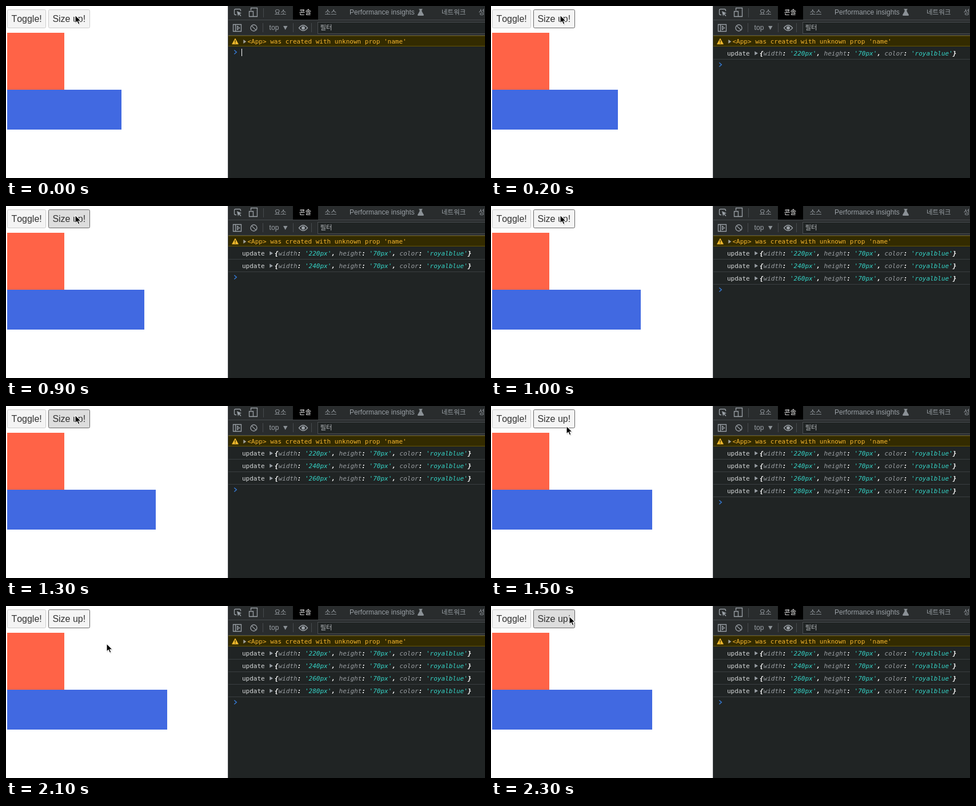
An HTML page for the animation above (2.4 s loop, 838 by 302 pixels).

```html
<!DOCTYPE html>
<html lang="ko">
<head>
<meta charset="utf-8">
<title>Console updates</title>
<style>
html, body { margin: 0; width: 100%; height: 100%; overflow: hidden; background: #fff; }
svg { display: block; }
text { white-space: pre; }
.button { font: 16px "Liberation Sans", Arial, sans-serif; font-kerning: none; fill: #333; }
.ui { font: 12px "Liberation Sans", Arial, sans-serif; letter-spacing: .06px; fill: #9aa0a6; }
.ko { font: 11.5px "Noto Sans CJK KR", "Noto Sans CJK", "Noto Sans CJK JP", sans-serif; fill: #9aa0a6; }
.mono { font: 11px "DejaVu Sans Mono", Menlo, monospace; fill: #d5d8d9; }
.object { font-style: italic; fill: #fff; }
.key { fill: #9a9fa3; }
.value { fill: #35d4c7; }
.mark { font-weight: bold; }
.icon { fill: none; stroke: #9aa0a6; stroke-width: 1.3; }
.line { fill: none; stroke: #474b4e; }
</style>
</head>
<body>
<svg width="838" height="302" viewBox="0 0 838 302">
  <g stroke="#ccc" fill="#f4f4f4">
    <rect x="2.5" y="6.5" width="67" height="32" rx="2"/>
    <rect id="size" x="74.5" y="6.5" width="72" height="32" rx="2"/>
  </g>
  <text class="button" x="9.4" y="28">Toggle!</text>
  <text class="button" x="81.4" y="28">Size up!</text>
  <rect x="2" y="47" width="100" height="100" fill="tomato"/>
  <rect id="bar" x="2" y="147" width="200" height="70" fill="royalblue"/>

  <rect x="388" width="450" height="302" fill="#202424"/>
  <rect x="388" width="450" height="51" fill="#292c2d"/>
  <rect x="502" width="44" height="24" fill="#000"/>
  <rect x="545.5" y="28.5" width="300" height="20" fill="#202424" stroke="#4a4e51"/>
  <path class="line" d="M388 24.5H838M388 51.5H838M388.5 0V302M450.5 4V20M449.5 30V46M502.5 30V46M534.5 30V46"/>

  <g class="icon">
    <path d="M403 15.500H401.500Q399.500 15.500 399.500 13.500V7.500Q399.500 5.500 401.500 5.500H408.500Q410.500 5.500 410.500 7.500V9"/>
    <path d="M404 9L412 12.500 408.700 13.700 411.500 17 410.500 18 407.500 14.800 406 18Z" fill="#9aa0a6" stroke="none"/>
    <path d="M428.500 8V3.500H439.500V18.500H433M425.500 9.500H432.500V18.500H425.500Z"/>
    <path d="M397.500 32.500H411.500V44.500H397.500ZM401.500 32.500V44.500M404.500 35.500L408.500 38.500 404.500 41.500Z"/>
    <circle cx="433.500" cy="38.500" r="5.500"/>
    <path d="M429.600 34.600L437.400 42.400"/>
    <path d="M512.500 38.500Q520 29 527.500 38.500Q520 48 512.500 38.500Z"/>
    <circle cx="520" cy="38.500" r="2.300" fill="#9aa0a6"/>
  </g>
  <path d="M722.500 5H728.500V6.200H727.500V9.500L731 15.500Q731 17 729.500 17H721.500Q720 17 720 15.500L723.500 9.500V6.200H722.500ZM485 35H492.500L488.700 42Z" fill="#8b9196"/>

  <text class="ko" x="469.500" y="14.500">요소</text>
  <text class="ko" x="512.800" y="14.500" style="fill:#fff">콘솔</text>
  <text class="ko" x="557.500" y="14.500">소스</text>
  <text class="ui" x="601" y="15">Performance insights</text>
  <text class="ko" x="762" y="14.500">네트워크</text>
  <text class="ko" x="826.800" y="14.500">성</text>
  <text class="ui" x="460.500" y="42">top</text>
  <text class="ko" x="549.500" y="42" style="fill:#b3b7ba">필터</text>

  <rect x="389" y="52" width="449" height="19" fill="#332b00"/>
  <path d="M389 52.500H838M389 70.500H838" stroke="#665500"/>
  <path d="M401 57L406.500 67H395.500Z" fill="#f5bc2f" stroke="#f5bc2f" stroke-linejoin="round" stroke-width=".6"/>
  <path d="M401 60V63.700M401 64.700V66" stroke="#332b00" stroke-width="1.300"/>
  <path d="M415.300 59L420.300 62.500 415.300 66Z" fill="#a0a19c"/>
  <text class="mono" x="422.500" y="66" style="fill:#f5b52e">&lt;App&gt; was created with unknown prop 'name'</text>

  <g id="log"></g>
  <path id="prompt" d="M399.300 77.500L403.300 81 399.300 84.500" fill="none" stroke="#367cd8" stroke-width="1.400"/>
  <path id="caret" d="M412.500 75V88" stroke="#fff"/>
  <g id="cursor">
    <path d="M0 0V14.200L3.300 11.200 5.500 16.300 8 15.200 5.900 10.300H10.300Z" fill="#000" fill-opacity=".2" transform="translate(.6 1.200)"/>
    <path d="M0 0V14.200L3.300 11.200 5.500 16.300 8 15.200 5.900 10.300H10.300Z" stroke="#fff" stroke-width="1.100"/>
  </g>
</svg>
<script>
const LOOP = 2400, STEP = 100;
const clicks = [200, 600, 1000, 1400];      // mouse released
const presses = [100, 500, 900, 1300, 2300];
const HOLD = 100;
const home = [121, 16];
const moveStart = 1500;
const path = [[132, 35], [185, 100], [226, 150], [230, 125], [230, 125],
              [219, 112], [176, 66], [143, 25], [137, 18]];

const get = id => document.getElementById(id);
const span = (type, s) => `<tspan class="${type}">${s}</tspan>`;
const field = (key, value) => span('key', key) + span('mark', ': ') + span('value', `'${value}'`);

function logRow(i) {
  const fields = [['width', `${220 + 20 * i}px`], ['height', '70px'], ['color', 'royalblue']];
  const body = fields.map(f => field(...f)).join(span('mark', ', '));
  return `<g transform="translate(0 ${22 * i})">
    <text class="mono" x="413" y="87">update</text>
    <path d="M461.300 79.500L467 83 461.300 86.500Z" fill="#9aa0a6"/>
    <text class="mono object" x="470" y="87">${span('mark', '{')}${body}${span('mark', '}')}</text>
    <path d="M389 93.500H838" stroke="#3a3f41"/></g>`;
}

get('log').innerHTML = clicks.map((_, i) => logRow(i)).join('');
const rows = [...get('log').children];

function draw(now) {
  const t = Math.floor(now % LOOP / STEP) * STEP;
  const count = clicks.filter(c => t >= c).length;
  const down = presses.some(p => t >= p && t < p + HOLD);
  const focused = t >= presses[0];
  const [x, y] = t < moveStart ? home : path[(t - moveStart) / STEP];

  rows.forEach((row, i) => row.style.display = i < count ? '' : 'none');
  get('bar').setAttribute('width', 200 + 20 * count);
  get('prompt').setAttribute('transform', `translate(0 ${22 * count})`);
  get('caret').style.display = focused ? 'none' : '';
  get('size').setAttribute('fill', down ? '#ddd' : '#f4f4f4');
  get('size').setAttribute('stroke', focused ? '#666' : '#ccc');
  get('cursor').setAttribute('transform', `translate(${x} ${y})`);
}

const start = performance.now();
function tick() {
  draw(performance.now() - start);
  requestAnimationFrame(tick);
}
tick();
</script>
</body>
</html>
```
